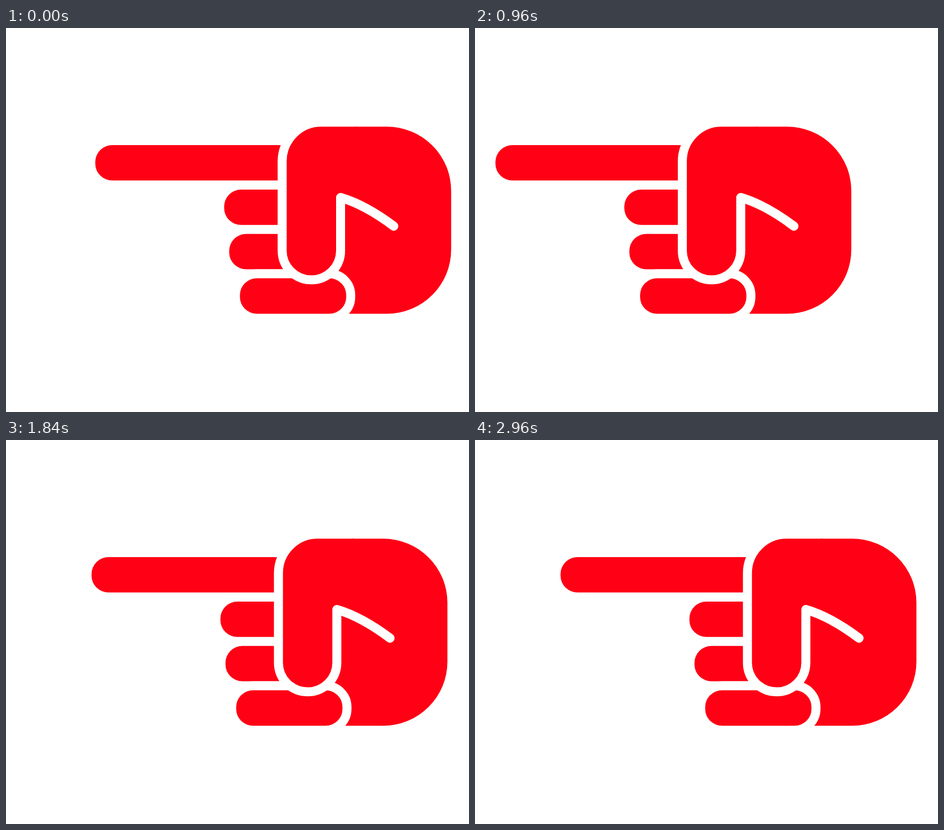
An HTML page for the animation above (3000 ms loop, 822 px wide and 682 px high).

```html
<!DOCTYPE html>
<html lang="en">
<head>
<meta charset="utf-8">
<title>Pointing hand</title>
<style>
  html, body { margin: 0; width: 100%; height: 100%; overflow: hidden; background: #fff; }
  svg { display: block; width: 822px; height: 682px; }
  #hand { fill: #ff0015; }
  .gap { stroke: #fff; stroke-linecap: round; stroke-linejoin: round; }
</style>
</head>
<body>
<svg viewBox="0 0 822 682">
  <g id="hand">
    <rect x="158.5" y="208" width="380" height="62.8" rx="30.2" ry="29.8"/>
    <rect x="387.3" y="287" width="150" height="62.8" rx="30.2" ry="29.8"/>
    <rect x="396.3" y="365.8" width="140" height="62.8" rx="30.2" ry="29.8"/>
    <!-- palm -->
    <path d="M559.5 175.3H676.5A113.8 113.8 0 0 1 790.3 289.1V393.6A113.8 113.8 0 0 1 676.5 507.4H559.5Z"/>
    <!-- little finger, cut out of the palm -->
    <rect class="gap" x="415.3" y="444.6" width="188.7" height="62.8" rx="30" ry="29.6"
      stroke-width="32" paint-order="stroke"/>
    <!-- crease, thumb and knuckle outline -->
    <path class="gap" stroke-width="16"
      d="M688.5 352Q638 314 594 301V395.4A51.85 51.85 0 0 1 490.3 395.4V236.5A69.2 69.2 0 0 1 559.5 167.3H620"/>
  </g>
</svg>
<script>
  const PERIOD = 600, STEP = 40, REACH = 136.4;
  const hand = document.getElementById('hand');
  const start = performance.now();
  const smooth = u => u * u * (3 - 2 * u);

  function draw(time) {
    const held = Math.floor(time / STEP + 0.01) * STEP;
    const phase = (held % PERIOD) / (PERIOD / 2);
    const out = phase < 1 ? phase : 2 - phase;
    hand.setAttribute('transform', `translate(${-REACH * smooth(out)} 0)`);
  }

  function tick() {
    draw(performance.now() - start);
    requestAnimationFrame(tick);
  }
  tick();
</script>
</body>
</html>
```
